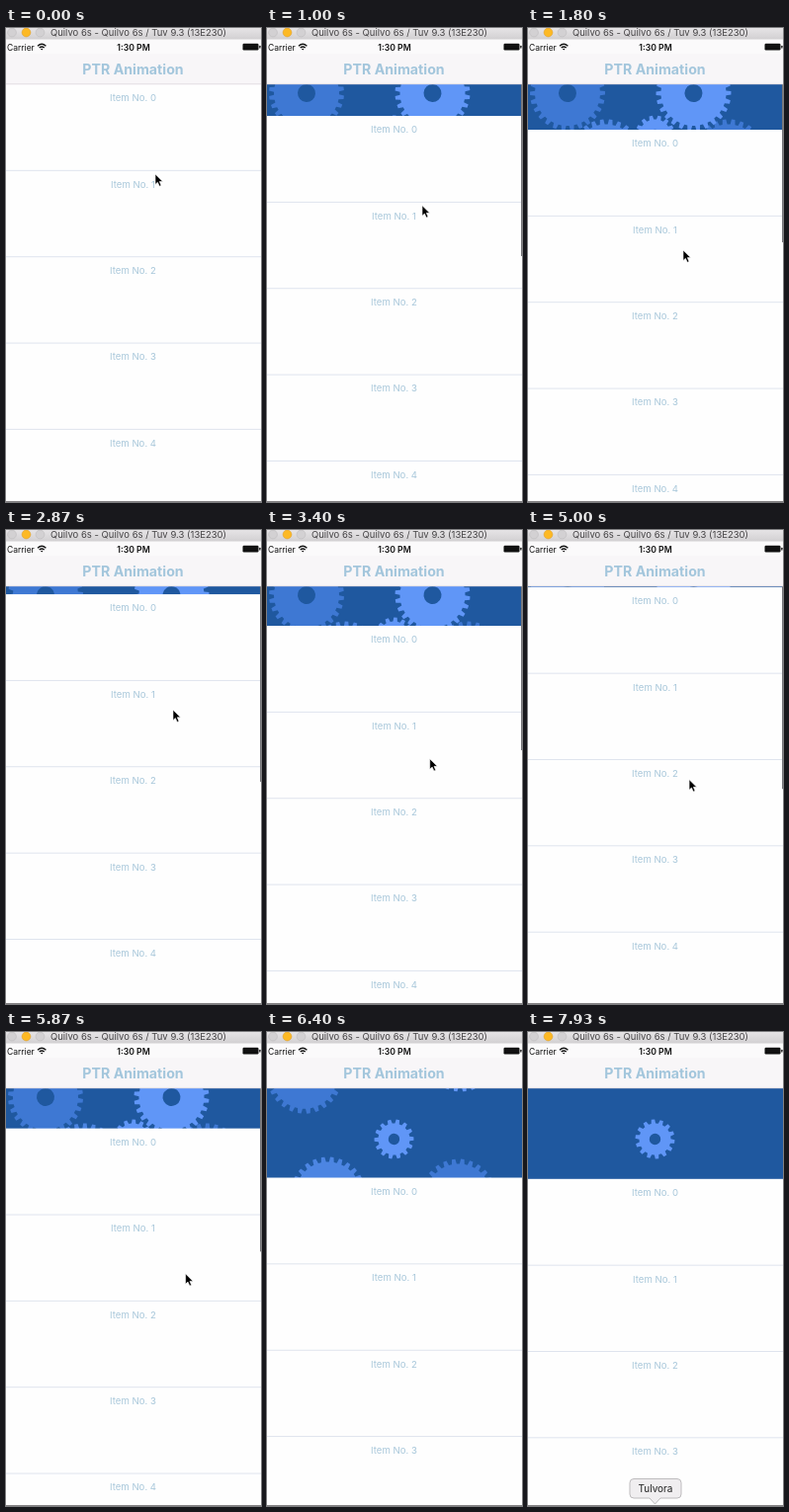
Write an HTML page that moves like this. It is 258 px wide and 480 px high and loops after 8000 ms.

```html
<!DOCTYPE html>
<html lang="en">
<head>
<meta charset="utf-8">
<title>PTR Animation</title>
<style>
  html, body { margin: 0; width: 100%; height: 100%; overflow: hidden; background: #fff; }
  svg { display: block; width: 100%; height: 100%; }
  text { font-family: Inter, Roboto, sans-serif; text-anchor: middle; }
  .item { font-size: 9.6px; fill: #a8c7da; }
  .line { stroke: #dfe4ee; stroke-width: 1; }
</style>
</head>
<body>
<svg viewBox="0 0 258 480">
  <defs>
    <linearGradient id="chrome" x2="0" y2="1">
      <stop offset="0" stop-color="#e6e4e6"/>
      <stop offset="1" stop-color="#d2d0d2"/>
    </linearGradient>
  </defs>

  <rect y="57" width="258" height="120" fill="#1f589f"/>
  <g id="gears"></g>

  <g id="list"><rect y="57" width="258" height="520" fill="#fefefe"/></g>
  <rect id="scrollbar" x="257" y="57" width="1" height="0" fill="#77777b"/>

  <g id="header">
    <rect width="258" height="57" fill="#f8f6f8"/>
    <rect y="56.5" width="258" height=".7" fill="#d9d3d9"/>
    <rect y="11" width="258" height="15" fill="#fbfafb"/>
    <rect width="258" height="11.5" fill="url(#chrome)"/>
    <g stroke-width=".6">
      <circle cx="6" cy="4.5" r="4.4" fill="#d3d1d3" stroke="#bcbabc"/>
      <circle cx="20.500" cy="4.5" r="4.4" fill="#fdb924" stroke="#e0a02c"/>
      <circle cx="34.500" cy="4.500" r="4.4" fill="#d3d1d3" stroke="#bcbabc"/>
    </g>
    <text x="134" y="8.200" font-size="9.5" fill="#454345">Quilvo 6s - Quilvo 6s / Tuv 9.3 (13E230)</text>
    <text x="1" y="22.500" font-size="8.5" fill="#111" style="text-anchor:start">Carrier</text>
    <g fill="none" stroke="#111" stroke-width="1.3">
      <path d="M32 18.200Q36.200 14.300 40.400 18.200M33.700 20.100Q36.200 17.800 38.700 20.100"/>
      <path d="M36.200 22.500L35 21.200Q36.200 20.200 37.400 21.200Z" fill="#111" stroke="none"/>
    </g>
    <text x="129" y="22.500" font-size="8.700" font-weight="600" fill="#111">1:30 PM</text>
    <rect x="239.500" y="15.800" width="16" height="6.700" rx="1.2" fill="#111"/>
    <rect x="256.200" y="17.700" width="1.300" height="2.800" rx=".6" fill="#111"/>
    <text x="128.500" y="47" font-size="14.200" font-weight="700" fill="#a3c6dc">PTR Animation</text>
  </g>

  <g id="tip">
    <path d="M107 452.500H151Q155 452.500 155 456.500V468Q155 472 151 472H134L128.500 478L123 472H107Q103 472 103 468V456.500Q103 452.500 107 452.500Z"
          fill="#f0eef0" stroke="#bdbbbd"/>
    <text x="129" y="466" font-size="10" fill="#222">Tulvora</text>
  </g>
  <rect y="479" width="258" height="1" fill="#858385"/>
  <path id="cursor" d="M0 0V10.500L2.400 8.300L4.200 12.300L6 11.500L4.300 7.600H7.600Z"
        fill="#000" stroke="#fff" stroke-width=".6"/>
</svg>

<script>
const LOOP = 8000;
const SVG = 'http://www.w3.org/2000/svg';
const $ = id => document.getElementById(id);

function add(parent, tag, attrs, text = '') {
  const node = document.createElementNS(SVG, tag);
  for (const key in attrs) node.setAttribute(key, attrs[key]);
  node.textContent = text;
  return parent.appendChild(node);
}

function gearPath(teeth, body, outer, hole) {
  const pitch = 2 * Math.PI / teeth;
  const corners = [[-.31, body], [-.19, outer], [.19, outer], [.31, body]];
  let d = '';
  for (let i = 0; i < teeth; i++) {
    for (const [shift, r] of corners) {
      const a = (i + shift) * pitch;
      d += `${d ? 'L' : 'M'}${(r * Math.cos(a)).toFixed(2)} ${(r * Math.sin(a)).toFixed(2)}`;
    }
  }
  return d + `ZM${hole} 0A${hole} ${hole} 0 1 0 ${-hole} 0A${hole} ${hole} 0 1 0 ${hole} 0Z`;
}

const big = gearPath(26, 33, 38, 9);
const small = gearPath(14, 16, 20, 5.7);

// Position, direction of flight, spin ratio
const gears = [
  { x: 40, y: 66, dx: -2, dy: -21, spin: 1, fill: '#3e78d3', d: big },
  { x: 79, y: 130.5, dx: -17, dy: 33.500, spin: -1, fill: '#4c85e2', d: big },
  { x: 203, y: 130.5, dx: -9, dy: 35.500, spin: -1, fill: '#3e78d3', d: big },
  { x: 167.5, y: 66, dx: 28, dy: -43, spin: 1, fill: '#6096f7', d: big },
  { x: 128.5, y: 108.5, dx: 0, dy: 0, spin: -26 / 14, fill: '#6096f7', d: small }
];
for (const gear of gears) {
  gear.node = add($('gears'), 'path', { d: gear.d, fill: gear.fill, 'fill-rule': 'evenodd' });
}

const ROW = 87.35;
for (let i = 0; i < 5; i++) {
  const top = 57 + i * ROW;
  add($('list'), 'text', { class: 'item', x: 128.5, y: top + 17.4 }, `Item No. ${i}`);
  add($('list'), 'path', { class: 'line', d: `M0 ${top + ROW}H258` });
}

const pulls = [
  [500, 0], [700, 15], [900, 28], [1100, 36], [1330, 42], [1700, 46], [2070, 46],
  [2800, 0], [2870, 8], [3070, 24], [3400, 40], [3800, 50], [4530, 50],
  [5630, 0], [5800, 30], [6000, 60], [6200, 80], [6330, 88], [6400, 90.5], [6470, 91.8]
];
const pointer = [
  [0, 151, 148], [270, 157, 126], [500, 157, 126], [1330, 157, 215], [1700, 157, 225],
  [2150, 157, 225], [2650, 169, 165], [2790, 169, 165], [2870, 169, 182], [3070, 167, 210],
  [3800, 162, 258], [4600, 162, 258], [4950, 163, 253], [5000, 163, 253], [5400, 186, 134],
  [5470, 187, 134], [5650, 187, 134], [6350, 170, 485]
];
const releases = [[2070, 2800, 46], [4530, 5630, 50]];

function sample(track, t) {
  const next = track.findIndex(key => key[0] > t);
  if (next === 0) return track[0].slice(1);
  if (next < 0) return track[track.length - 1].slice(1);
  const a = track[next - 1], b = track[next];
  const k = (t - a[0]) / (b[0] - a[0]);
  return a.slice(1).map((v, i) => v + (b[i + 1] - v) * k);
}

function pullAt(t) {
  for (const [start, end, height] of releases) {
    if (t >= start && t < end) {
      const x = (t - start) * .013;
      return height * (1 + x) * Math.exp(-x);
    }
  }
  return sample(pulls, t)[0];
}

const move = (node, x, y, extra = '') =>
  node.setAttribute('transform', `translate(${x.toFixed(2)} ${y.toFixed(2)})${extra}`);

function draw(t) {
  const pull = pullAt(t);
  const flight = Math.max(0, (t - 6330) / 70);
  const angle = pull * 1.5 + Math.max(0, t - 6330) * .05;

  move($('list'), 0, pull);
  move($('cursor'), ...sample(pointer, t));
  for (const g of gears) {
    move(g.node, g.x + g.dx * flight, g.y + g.dy * flight, ` rotate(${(angle * g.spin).toFixed(2)})`);
  }

  const scrolling = (t > 520 && t < 5350) || (t > 5650 && t < 6340);
  $('scrollbar').setAttribute('height', scrolling ? 206 - pull : 0);
  $('tip').setAttribute('visibility', t >= 6670 ? 'visible' : 'hidden');
}

function tick() {
  draw(performance.now() % LOOP);
  requestAnimationFrame(tick);
}
tick();
</script>
</body>
</html>
```
